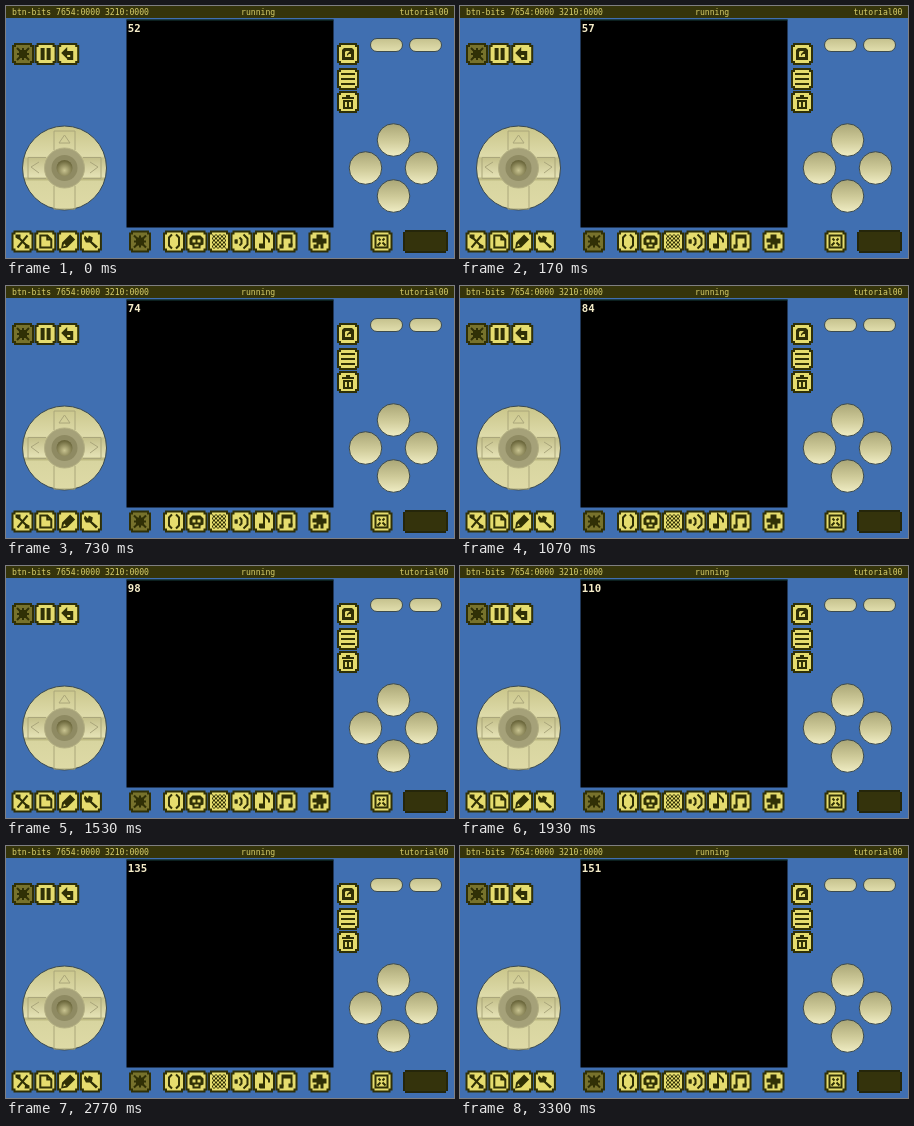
Recreate the animation shown at these times as an HTML page. Size 448x252 px, loop 3.33 s.

```html
<!DOCTYPE html>
<html lang="en">
<head>
<meta charset="utf-8">
<title>Handheld counter</title>
<style>
  html, body { margin: 0; width: 100%; height: 100%; overflow: hidden; background: #406fb1; }
  svg { display: block; width: 100vw; height: 100vh; }
  text { font-family: "DejaVu Sans Mono", monospace; white-space: pre; }
  .bar { font-size: 8.13px; fill: #d9d06c; }
  #count { font-size: 10.7px; font-weight: bold; fill: #f6edc9; }
  .ink { fill: #303006; }
  .line { fill: none; stroke: #303006; stroke-width: 2; }
</style>
</head>
<body>
<svg id="stage" viewBox="0 0 448 252" preserveAspectRatio="none">
  <defs>
    <linearGradient id="pad" x1="0" y1="0" x2="0" y2="1">
      <stop offset="0" stop-color="#c9c589"/>
      <stop offset=".36" stop-color="#dedbaa"/>
      <stop offset=".38" stop-color="#c4c08a"/>
      <stop offset=".6" stop-color="#e4e1b4"/>
      <stop offset=".63" stop-color="#b7b37a"/>
      <stop offset=".66" stop-color="#d8d5a0"/>
      <stop offset="1" stop-color="#dedaa6"/>
    </linearGradient>
    <linearGradient id="key" x1="0" y1="0" x2="0" y2="1">
      <stop offset="0" stop-color="#aaa676"/>
      <stop offset=".55" stop-color="#d0cc9b"/>
      <stop offset="1" stop-color="#f0edc4"/>
    </linearGradient>
    <linearGradient id="pill" x1="0" y1="0" x2="0" y2="1">
      <stop offset="0" stop-color="#c5c18d"/>
      <stop offset="1" stop-color="#e2dfae"/>
    </linearGradient>
    <radialGradient id="knob" cx=".5" cy=".65" r=".6">
      <stop offset="0" stop-color="#c9c491"/>
      <stop offset="1" stop-color="#69653a"/>
    </radialGradient>
    <pattern id="check" width="4" height="4" patternUnits="userSpaceOnUse">
      <path class="ink" d="M0 0h2v2h-2zM2 2h2v2h-2z"/>
    </pattern>
  </defs>

  <rect width="448" height="252" fill="#406fb1"/>
  <rect width="448" height="12" fill="#35340b"/>
  <text class="bar" x="6" y="9">btn-bits 7654:0000 3210:0000</text>
  <text class="bar" x="235" y="9">running</text>
  <text class="bar" x="442.5" y="9" text-anchor="end">tutorial00</text>

  <rect x="120.5" y="13.5" width="207" height="208"/>
  <rect x="120.5" y="13.5" width="207" height="1" fill="#163f3d"/>
  <text id="count" x="121.8" y="26"></text>

  <g stroke="#3b4a50" stroke-width="1">
    <circle cx="58.5" cy="162" r="42" fill="url(#pad)"/>
    <g fill="none" stroke="#aaa67b">
      <path d="M48 144V125H69V144M48 180V203H69V180M40 151.500H22V172.500H40M77 151.500H95V172.500H77"/>
      <path d="M53 137L58.500 129L64 137ZM33 156L25 161L33 167M84 156L92 161L84 167"/>
    </g>
    <circle cx="58.500" cy="162" r="20" fill="#a5a179" stroke="#b4b083"/>
    <circle cx="58.500" cy="162" r="13" fill="#8e8a62" stroke="none"/>
    <circle cx="58.500" cy="162" r="8" fill="url(#knob)" stroke="none"/>
    <g id="keys" fill="url(#key)"></g>
    <rect x="364.500" y="32.500" width="32" height="13" rx="6.500" fill="url(#pill)"/>
    <rect x="403.500" y="32.500" width="32" height="13" rx="6.500" fill="url(#pill)"/>
  </g>

  <g id="buttons"></g>
  <path d="M399 224H440V226H442V245H440V247H399V245H397V226H399Z" fill="#25260a"/>
  <rect x="399" y="226" width="41" height="19" fill="#34330c"/>
</svg>
<script>
const LOOP = 3330, FIRST = 52;
const byId = id => document.getElementById(id);
const ink = d => `<path class="ink" fill-rule="evenodd" d="${d}"/>`;
const line = d => `<path class="line" d="${d}"/>`;

const icons = {
  stop: ink("M-4-4H4V4H-4Z") + line("M-6-6L6 6M6-6L-6 6M0-6V6M-6 0H6"),
  pause: ink("M-5-6H-1V6H-5ZM1-6H5V6H1Z"),
  back: ink("M-7-1L-1-7V-3H5V6H-1V3H2V1H-1V5Z"),
  gauge: ink("M-4-6H4L6-4V6H-6V-4ZM-3-2V3H3V0H1L-1 2V0L2-3H-2Z"),
  menu: ink("M-7-6H7V-4H-7ZM-7-1H7V1H-7ZM-7 4H7V6H-7Z"),
  trash: ink("M-6-5H-2V-7H2V-5H6V-3H-6ZM-5-2H5V7H-5ZM-3 0V5H-1V0ZM1 0V5H3V0Z"),
  tools: line("M-6-6L6 6M5-6L-5 6") + ink("M-7-7H-2V-4L-4-2L-7-4ZM3 2L7 4V7H2Z"),
  page: line("M-5-6H2L6-2V6H-5Z") + ink("M1-6H3V-3H6V-1H1Z"),
  pencil: ink("M2-7L7-2L-1 6L-7 7L-6 1ZM-4 2L-5 5L-2 4Z"),
  wrench: ink("M-6-6L-3-3L-2-6L2-4L1 0L7 5L5 7L-1 1L-5 1L-7-3Z"),
  parens: line("M-2-7L-5-4V4L-2 7M2-7L5-4V4L2 7"),
  face: ink("M-4-6H4L7-3V3L4 4V7H-4V4L-7 3V-3ZM-4-2V1H-1V-2ZM1-2V1H4V-2ZM-2 3V5H2V3Z"),
  check: '<rect x="-7" y="-7" width="14" height="14" fill="url(#check)"/>',
  sound: line("M-5-2V2M-2-4L0-2V2L-2 4M2-7L6-3V3L2 7") + ink("M-7-2H-4V2H-7Z"),
  note: line("M0 5V-7L5-2V1") + ink("M-5 2H1V7H-4L-5 6Z"),
  notes: line("M-4 5V-6H5V4") + ink("M-4-6H5V-3H-4ZM-7 3H-3V7H-7ZM2 2H6V6H2Z"),
  plug: ink("M-3-7H3V-3H7V2H4V7H1V3H-1V7H-6V3H-3V1H-7V-3H-3Z"),
  grid: line("M-6-6H6V6H-6Z") + line("M-3-3L-1-1M3-3L1-1M-4 4L-1 1M4 4L1 1")
};

// Notched square button centred on x, y
function button(name, x, y) {
  const dim = name === "stop";
  return `<g transform="translate(${x} ${y})">
    <path class="ink" d="M-9-11H9V-9H11V9H9V11H-9V9H-11V-9H-9Z"/>
    <path d="M-7-9H7V-7H9V7H7V9H-7V7H-9V-7H-7Z" fill="${dim ? "#77722c" : "#e5dc6e"}"/>
    ${icons[name]}</g>`;
}
const row = (names, x, y, dx, dy = 0) =>
  names.split(" ").map((n, i) => button(n, x + i * dx, y + i * dy)).join("");

byId("buttons").innerHTML =
  row("stop pause back", 17, 48, 22.6) +
  button("gauge", 342, 48) +
  row("menu trash", 342, 73, 0, 23) +
  row("tools page pencil wrench", 16.5, 235.5, 22.8) +
  button("stop", 134, 235.5) +
  row("parens face check sound note notes", 168, 235.5, 22.5) +
  button("plug", 313.5, 235.5) +
  button("grid", 375.5, 235.5);

byId("keys").innerHTML = [[0, -1], [-1, 0], [1, 0], [0, 1]]
  .map(([x, y]) => `<circle cx="${387.5 + 28 * x}" cy="${162 + 28 * y}" r="16.3"/>`).join("");

// Three ticks per 100 ms, held 30, 40 and 30 ms
function tick(t) {
  const rest = t % 100;
  return 3 * Math.floor(t / 100) + (rest >= 30) + (rest >= 70);
}

const count = byId("count");
const start = performance.now();
function draw() {
  count.textContent = FIRST + tick((performance.now() - start) % LOOP);
  requestAnimationFrame(draw);
}
draw();
</script>
</body>
</html>
```
